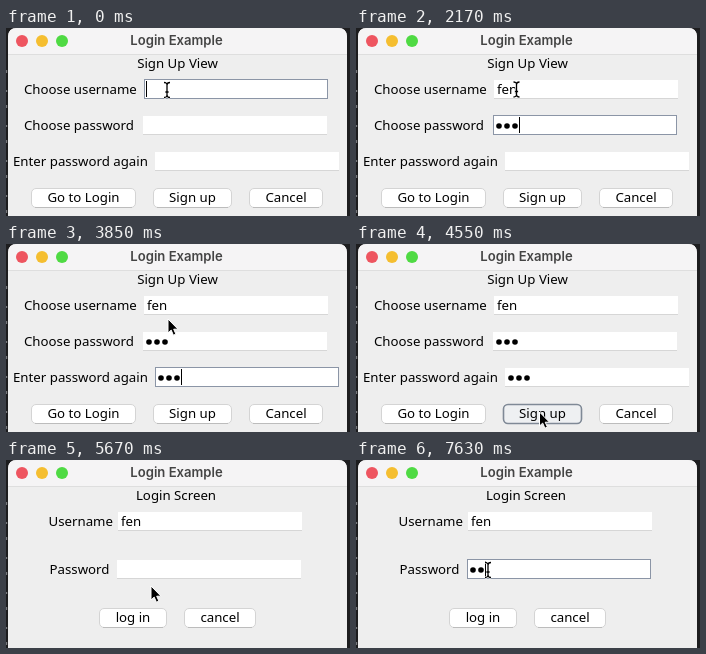
These frames come from a looping animation (344x188 px, 8 s). An HTML page:

```html
<!DOCTYPE html>
<html lang="en">
<head>
<meta charset="utf-8">
<title>Login Example</title>
<style>
html, body { margin: 0; width: 100%; height: 100%; overflow: hidden; background: #1d1d1f; }
svg { display: block; width: 344px; height: 188px; }
text { font: 13.25px "Noto Sans", "Open Sans", sans-serif; fill: #000; }
.title { font: 600 13.1px Inter, sans-serif; fill: #444; text-anchor: middle; }
.mid { text-anchor: middle; }
.field rect { fill: #fff; }
.field .edge { fill: #d6d6d6; }
.field .ring { fill: none; stroke: #8b95a6; display: none; }
.field.focus .ring { display: inline; }
.button .face { fill: #fff; stroke: #d4d4d4; }
.button .base { fill: none; stroke: #bcbcbc; }
.button.focus .face { fill: #eef0f2; stroke: #7f8996; stroke-width: 1.6; }
.button.focus .base { display: none; }
</style>
</head>
<body>
<svg viewBox="0 0 344 188">
  <rect width="344" height="188" fill="#1d1d1f"/>
  <path d="M.6 42V188" stroke="#77787c" stroke-width="1.2" stroke-dasharray="3 17 2 13"/>
  <path d="M2 188V9Q2 0 11 0H332Q341 0 341 9V188Z" fill="#eee"/>
  <path d="M2 26.5V9Q2 0 11 0H332Q341 0 341 9V26.5Z" fill="#f5f4f5"/>
  <path d="M2 26.5H341" stroke="#dedede"/>
  <circle cx="16" cy="13" r="6" fill="#ee5560"/>
  <circle cx="36" cy="13" r="6" fill="#f5be30"/>
  <circle cx="56" cy="13" r="6" fill="#4fda43"/>
  <text class="title" x="170.5" y="17.3">Login Example</text>
  <g id="signup"></g>
  <g id="login"></g>
  <rect id="caret" width="1" height="16"/>
  <path id="arrow" d="M0 0V14L3.2 11.1L5.4 16.2L7.9 15.1L5.7 10.2H10Z" stroke="#fff" stroke-linejoin="round"/>
  <g id="beam" fill="none" stroke-linejoin="round">
    <path d="M-3-7.5Q0-7.5 0-5Q0-7.5 3-7.5M0-5V5M-3 7.5Q0 7.5 0 5Q0 7.5 3 7.5M-1.6 2H1.6" stroke="#fff" stroke-width="2.6"/>
    <path d="M-3-7.5Q0-7.5 0-5Q0-7.5 3-7.5M0-5V5M-3 7.5Q0 7.5 0 5Q0 7.5 3 7.5M-1.6 2H1.6" stroke="#000" stroke-width="1.3"/>
  </g>
</svg>
<script>
const LOOP = 8000, TICK = 70, DOT = 8, USER = 'fen';
const $ = id => document.getElementById(id);

function add(parent, tag, attrs, text = '') {
  const el = document.createElementNS('http://www.w3.org/2000/svg', tag);
  for (const key in attrs) el.setAttribute(key, attrs[key]);
  el.textContent = text;
  return parent.appendChild(el);
}

const label = (view, text, x, y, cls = '') => add(view, 'text', { x, y, class: cls }, text);

function field(view, x, y, secret) {
  const el = add(view, 'g', { class: 'field' });
  add(el, 'rect', { x, y: y + 1, width: 184, height: 19 });
  add(el, 'rect', { class: 'edge', x, y: y + 19, width: 184, height: 1 });
  add(el, 'rect', { class: 'ring', x: x + .5, y: y + .5, width: 183, height: 19 });
  const marks = secret
    ? [0, 1, 2].map(i => add(el, 'circle', { cx: x + 6 + DOT * i, cy: y + 11, r: 2.8 }))
    : [label(el, '', x + 3, y + 15)];
  return { el, x, y, secret, marks };
}

function button(view, text, x, y, w) {
  const el = add(view, 'g', { class: 'button' });
  add(el, 'rect', { class: 'face', x: x + .5, y: y + .5, width: w - 1, height: 19, rx: 4.5 });
  add(el, 'path', { class: 'base', d: `M${x + 4} ${y + 19.5}h${w - 8}` });
  label(el, text, x + w / 2, y + 14, 'mid');
  return el;
}

const signup = $('signup'), login = $('login');

label(signup, 'Sign Up View', 171.5, 40, 'mid');
label(signup, 'Choose username', 18, 66);
label(signup, 'Choose password', 18, 102);
label(signup, 'Enter password again', 7, 138);
const name = field(signup, 138, 51);
const pass = field(signup, 137, 87, true);
const again = field(signup, 149, 123, true);
button(signup, 'Go to Login', 25, 160, 105);
const submit = button(signup, 'Sign up', 147, 160, 79);
button(signup, 'Cancel', 243, 160, 74);

label(login, 'Login Screen', 170, 40, 'mid');
label(login, 'Username', 42.5, 66);
label(login, 'Password', 43.5, 114);
const user = field(login, 112, 51);
const key = field(login, 111, 99, true);
button(login, 'log in', 93, 148, 68);
button(login, 'cancel', 178, 148, 72);
user.marks[0].textContent = USER;

const fields = [name, pass, again, key];
name.keys = [420, 630, 770];
pass.keys = [1820, 2030, 2170];
again.keys = [3080, 3290, 3430];
key.keys = [7210, 7630];

const focus = [[0, name], [1330, pass], [2520, again], [4480, submit], [4620, null], [6090, key]];
const blinks = [[70, 420], [6580, 7140]];
const nameCaret = [2, 7, 15, 23];

// time, x, y, pointer, glide towards the next row
const moves = [
  [0, 161, 62, 'beam'],
  [70, 160.5, 61.5, 'beam'],
  [3850, 162, 75, 'arrow', true],
  [4340, 183.5, 168, 'arrow'],
  [4620, 183.5, 170, 'arrow'],
  [5250, 183.5, 170, 'arrow', true],
  [5670, 145, 126, 'arrow', true],
  [5880, 131, 94, 'arrow', true],
  [6090, 129, 103, 'arrow'],
  [6580, 132, 110, 'beam']
];

const lastIndex = (rows, t) => rows.reduce((at, row, i) => row[0] <= t ? i : at, 0);
const show = (el, on) => { el.style.display = on ? '' : 'none'; };

function drawPointer(t) {
  const i = lastIndex(moves, t);
  let [start, x, y, kind, glide] = moves[i];
  if (glide) {
    const [end, nx, ny] = moves[i + 1];
    const p = (t - start) / (end - start);
    const k = p * p * (3 - 2 * p) * .4 + p * .6;
    x += (nx - x) * k;
    y += (ny - y) * k;
  }
  for (const id of ['arrow', 'beam']) show($(id), id === kind);
  $(kind).setAttribute('transform', `translate(${x} ${y})`);
}

function render(now) {
  const t = Math.floor((now % LOOP) / TICK + 1e-6) * TICK;
  const active = focus[lastIndex(focus, t)][1];
  show(signup, t < 4620);
  show(login, t >= 4620);
  submit.classList.toggle('focus', active === submit);

  for (const f of fields) {
    const count = f.keys.filter(k => k <= t).length;
    f.el.classList.toggle('focus', f === active);
    if (f.secret) f.marks.forEach((dot, i) => show(dot, i < count));
    else f.marks[0].textContent = USER.slice(0, count);
    if (f === active) {
      $('caret').setAttribute('x', f.x + (f.secret ? 2 + DOT * count : nameCaret[count]));
      $('caret').setAttribute('y', f.y + 2);
    }
  }
  show($('caret'), fields.includes(active) && !blinks.some(([a, b]) => t >= a && t < b));
  drawPointer(t);
}

const begin = performance.now();
function loop() {
  render(performance.now() - begin);
  requestAnimationFrame(loop);
}
loop();
</script>
</body>
</html>
```
